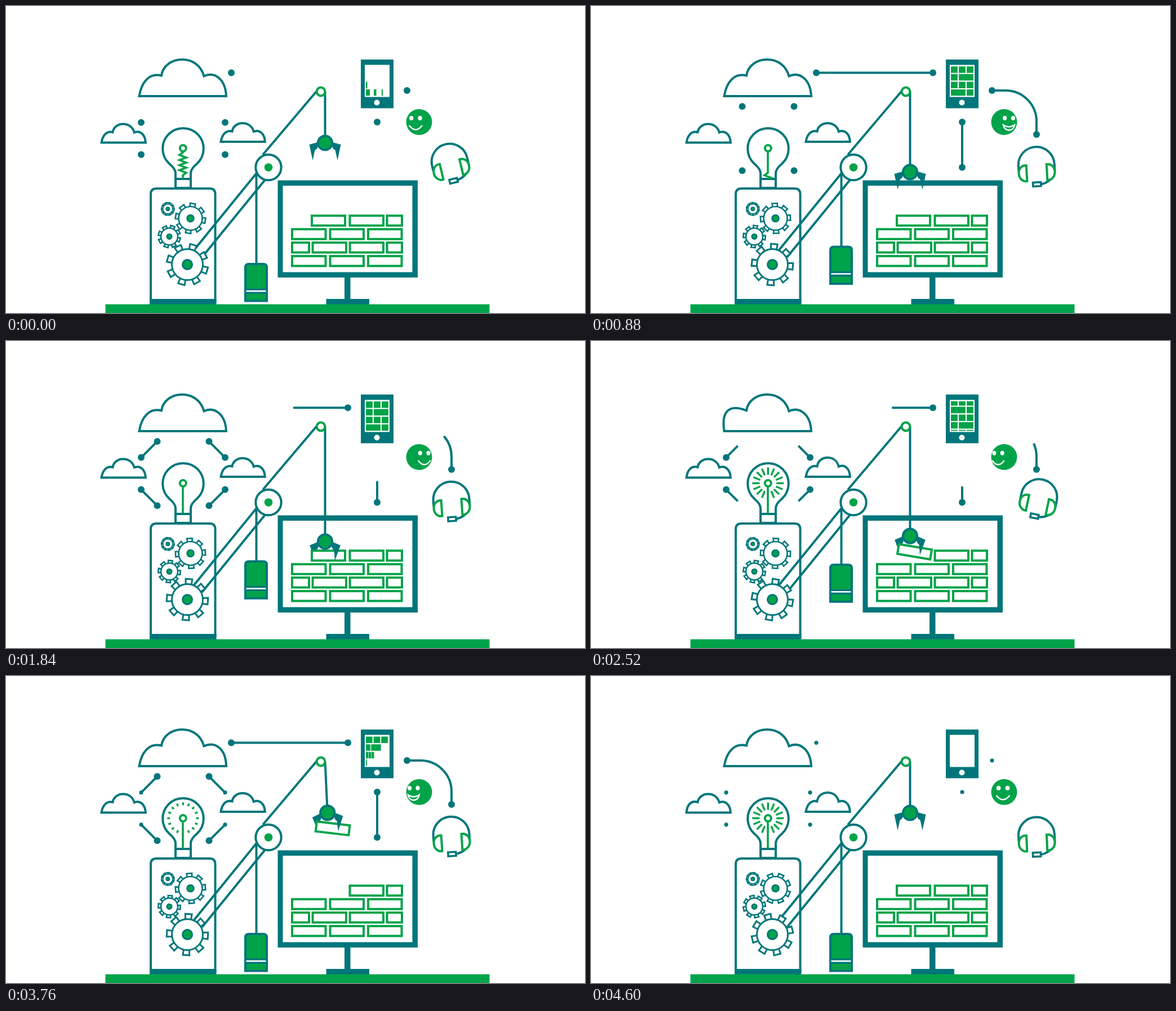
An HTML page with a canvas for the animation above (4.68 s loop, 1028 by 545 pixels).

```html
<!DOCTYPE html>
<html lang="en">
<head>
<meta charset="utf-8">
<title>Idea machine</title>
<style>
html, body { margin: 0; width: 100%; height: 100%; overflow: hidden; background: #fff; }
canvas { display: block; }
</style>
</head>
<body>
<canvas id="stage" width="1028" height="545"></canvas>
<script>
const c = document.getElementById('stage').getContext('2d');
const TEAL = '#00767a', GREEN = '#00a349', WHITE = '#fff';
const LOOP = 4680, STEP = 40, TAU = 2 * Math.PI;
const GRAB = 2360, RELEASE = 4560;

const rad = deg => deg * Math.PI / 180;
const clamp = v => Math.max(0, Math.min(1, v));
const ramp = (t, a, b) => clamp((t - a) / (b - a));
const ease = (t, a, b) => (1 - Math.cos(Math.PI * ramp(t, a, b))) / 2;

function paint(path, fill, stroke, width = 4) {
  if (fill) { c.fillStyle = fill; c.fill(path); }
  if (stroke) { c.strokeStyle = stroke; c.lineWidth = width; c.stroke(path); }
}
const shape = (d, ...style) => paint(new Path2D(d), ...style);

function disc(x, y, r, ...style) {
  if (r <= 0) return;
  const p = new Path2D();
  p.arc(x, y, r, 0, TAU);
  paint(p, ...style);
}

function box(x, y, w, h, ...style) {
  const p = new Path2D();
  p.rect(x, y, w, h);
  paint(p, ...style);
}

function at(x, y, angle, draw, flip = 1) {
  c.save();
  c.translate(x, y);
  c.rotate(rad(angle));
  c.scale(flip, 1);
  draw();
  c.restore();
}

// The lobes of a cloud swell one after another, five times per loop
function cloud(t, x, y, s, shift) {
  const swell = peak => {
    const d = t * 5 / LOOP - .42 - shift - peak;
    const off = Math.abs(d - Math.round(d));
    return off < .15 ? Math.cos(off / .15 * Math.PI / 2) ** 2 : 0;
  };
  const M = swell(-.04), L = swell(.3), R = swell(.72);
  const q = (...v) => v.map(n => n * s).join(' ');
  at(x, y, 0, () => shape(
    `M0 0C${q(4 - 10 * L, -25 - 9 * L, 18 - 12 * L, -42 - 8 * L, 39.5, -36.5)}` +
    `C${q(42, -54 - 12 * M, 58, -65 - 13 * M, 76, -65 - 13 * M)}` +
    `C${q(95, -65 - 13 * M, 110, -54 - 12 * M, 115, -35.5)}` +
    `C${q(134 + 12 * R, -44 - 8 * R, 153 + 10 * R, -30 - 9 * R, 154.5, 0)}Z`, WHITE, TEAL));
}

// Part a..b of a path; each end dot shows while the line reaches it
function link(d, length, x0, y0, x1, y1, a, b, startSize) {
  if (b - a > .002) {
    c.setLineDash([0, a * length, (b - a) * length, 2 * length]);
    shape(d, null, TEAL);
    c.setLineDash([]);
  }
  disc(x0, y0, 6 * startSize * clamp(1 - 8 * a), TEAL);
  disc(x1, y1, 6 * clamp(8 * b - 7), TEAL);
}

function links(t) {
  const leave = ease(t, 4160, 4500);
  const far = [
    ease(t, 1580, 2080) - ease(t, 2330, 2800),
    ease(t, 100, 560) - leave,
    1 - .4 * ramp(t, 4500, 4600)];
  link('M400 118.5H607', 207, 400, 118.5, 607, 118.5, ...far);
  link('M712 150H736A55 55 0 0 1 791 205V228', 133.4, 712, 150, 791, 228, ...far);
  link('M659 206V286.5', 80.5, 659, 206, 659, 286.5, ...far);

  const near = [
    ease(t, 480, 800) - ease(t, 1000, 1400),
    ease(t, 60, 380) - ease(t, 2400, 2740) + ease(t, 2760, 3000) - leave,
    1 - .4 * ease(t, 2740, 2960)];
  for (const sx of [-1, 1])
    for (const sy of [-1, 1]) {
      const x0 = 314.5 + 74.5 * sx, y0 = 235.3 + 28.5 * sy;
      const x1 = x0 - 28.5 * sx, y1 = y0 + 28.5 * sy;
      link(`M${x0} ${y0}L${x1} ${y1}`, 40.3, x0, y0, x1, y1, ...near);
    }
}

function gear(x, y, r, tip, hub, teeth, width, angle) {
  const w = r * .15 + .8, W = r * .17 + 1.2;
  at(x, y, angle, () => {
    for (let i = 0; i < teeth; i++) {
      c.rotate(TAU / teeth);
      shape(`M${-w} ${2 - r}L${-W} ${-tip}H${W}L${w} ${2 - r}Z`, WHITE, TEAL, width);
    }
  });
  disc(x, y, r, WHITE, TEAL, width);
  disc(x, y, hub, GREEN, TEAL, width);
}

function machine(t) {
  shape('M257 524V334Q257 324 267 324H361.5Q371.5 324 371.5 334V524Z', WHITE, TEAL);
  box(255, 520, 118.5, 10, TEAL);
  const spin = .14 * t;
  gear(287.3, 360.3, 8.8, 11.2, 3, 10, 2, spin);
  gear(327.5, 377, 21, 26.5, 6, 8, 2.6, spin + 9);
  gear(290, 409.3, 15, 19.5, 4.3, 8, 2.6, spin + 18);
  shape('M334 433L445 296.5M348 446L460 308.5M456 264L553 149.5', null, TEAL);
  gear(322, 459, 27.5, 36.5, 8.5, 8, 3, spin + 17);
}

function bulb(t) {
  shape('M301 307V297C301 290 296 285 290 280A36.3 36.3 0 1 1 339 280C333 285 328 290 328 297V307Z', WHITE, TEAL);
  box(301, 307, 27, 16, WHITE, TEAL);

  // A coil runs down the stem twice
  const second = t > 2900;
  const tail = 256 + 50 * (second ? ramp(t, 3080, 3500) : ramp(t, -140, 1100));
  const head = 256 + 50 * (second ? ramp(t, 2970, 3230) : ramp(t, -370, 60));
  let d = 'M314 258', side = 1;
  for (let y = 260; y < 306; y += 4.5) {
    d += `L${314 + (y > tail && y < head ? 6 * side : 0)} ${y}`;
    side = -side;
  }
  shape(d + 'L314 306', null, GREEN, 3.6);
  disc(314.3, 252.5, 5.5, WHITE, GREEN);

  // Rays grow from the rim inwards; the first burst dies away
  const late = t > 3300;
  const inner = 28 - 13 * (late ? ramp(t, 3640, 3960) : ramp(t, 2160, 2480));
  const outer = 28 - 13 * (late ? 0 : ramp(t, 2800, 2960));
  if (outer > inner)
    for (let a = -157.5; a < 180; a += 22.5)
      at(314.3, 252.5, a, () => shape(`M0 ${-inner}V${-outer}`, null, GREEN, 3.4));
}

function phone(t) {
  box(630, 95, 58, 86.5, TEAL);
  box(637, 104.5, 44, 57, WHITE);
  disc(658.5, 171.5, 5, WHITE);
  if (t > 4520) return;
  const scroll = 54 * ease(t, 1960, 2980);
  c.save();
  c.beginPath();
  c.rect(638, 107, 42, 52.5);
  c.clip();
  for (let row = -4; row < 4; row++) {
    const k = (row + 4) % 4;
    const left = 1 - ramp(t, 3420 + 110 * k, 3780 + 110 * k);
    for (let col = 0; col < 3; col++) {
      const grown = ramp(t, 90 * k + 50 * col - 140, 90 * k + 50 * col + 100);
      const joined = grown === 1 && k === 2 * col;
      box(639 + 14 * col * left, 148 - 13.6 * row - scroll,
        (12 * grown + (joined ? 2.5 : 0)) * left, 11.5, GREEN);
    }
  }
  c.restore();
}

function features(turn, grin) {
  if (Math.abs(turn) > 86) return;
  c.save();
  c.translate(23 * Math.sin(rad(turn)), 0);
  c.scale(Math.cos(rad(turn)), 1);
  for (const x of [-8, 8]) disc(x, -7, 3.9, WHITE);
  if (grin) shape('M-11 5Q0 12 11 5Q9 14 0 14.5Q-9 14 -11 5Z', null, WHITE, 2.4);
  else shape('M-12 6Q0 21 12 6', null, WHITE, 2.5);
  c.restore();
}

function face(t) {
  const turn = 27 * Math.sin(4 * TAU * t / LOOP + rad(215));
  const half = t % (LOOP / 2), grin = half > 400 && half < 1630;
  at(733.5, 206, 0, () => {
    disc(0, 0, 23, GREEN);
    c.beginPath();
    c.arc(0, 0, 23, 0, TAU);
    c.clip();
    features(turn, grin);
    features(turn - 110, grin);
  });
}

// Rests at a slight tilt and shakes twice per loop
function headset(t) {
  const s = (t + 200) % (LOOP / 2);
  const shake = s < 1100 ? Math.sin(Math.PI * s / 1100) : 0;
  const tilt = 18 * shake * Math.cos(TAU * (s - 380) / 330) - 4;
  at(791.8, 302 - .6 * Math.abs(tilt), tilt, () => {
    c.translate(0, -16);
    shape('M-32 8V-2A32 32 0 0 1 32 -2V10Q28 29 6 33', null, TEAL);
    for (const flip of [1, -1])
      at(0, 0, 0, () => shape('M-18 -2V26C-26 27 -32 20 -32 12C-32 4 -27 -3 -18 -2Z', WHITE, GREEN), flip);
    box(-8, 29, 14, 7, WHITE, TEAL, 3.6);
  });
}

const brick = (x, y, w) => box(x + 2, y + 2, w - 4, 17.5, WHITE, GREEN);

function monitor() {
  box(482.5, 309.5, 248.5, 172.5, TEAL);
  box(491.5, 319, 230, 153.5, WHITE);
  box(601, 481, 10.5, 40, TEAL);
  box(568.5, 520, 76.5, 10, TEAL);
  // Running bond; the first brick of the top row is the loose one
  for (let row = 0; row < 4; row++)
    for (let i = row ? 0 : 2; i < 4; i++) {
      const x = row % 2 ? 506 + 67.5 * i : 476.5 + 66 * i;
      const from = Math.max(506, x), to = Math.min(705, x + 63.5);
      if (to > from) brick(from, 370.3 + 23.9 * row, to - from);
    }
}

function crane(t) {
  const lower = 113 * (ease(t, 195, 1640) - ease(t, 2350, 3240))
    - 10 * Math.sin(Math.PI * ramp(t, 3150, 3360));
  const held = t < RELEASE;
  const grip = held ? 8 * ease(t, 1640, 1800) : 0;
  const sag = held ? ease(t, GRAB, 2500) : 0;
  const s = t - 3220;
  const sway = 4.5 * Math.sin(TAU * s / 720) * (s > 0 ? clamp(1 - s / 1340) : 0);

  const rise = -.59 * lower;
  shape(`M444.5 296V${458 + rise}`, null, TEAL);
  at(0, rise, 0, () => {
    shape('M425 523.5V464Q425 458 431 458H457Q463 458 463 464V523.5Z', GREEN, TEAL);
    box(425, 501.3, 38, 9.7, TEAL);
    box(426.5, 504.8, 35, 2.6, WHITE);
  });
  disc(466, 286.5, 22.7, WHITE, TEAL);
  disc(466, 286.5, 7.3, GREEN);

  const claw = () => shape('M-28 3L-10 -2L-14 10L-18 13L-22 31Z', TEAL);
  at(566.5, 152, sway, () => {
    const y = 91 + lower;
    shape(`M0 0V${y}`, null, TEAL);
    at(0, y, -grip, claw);
    const brickY = held && t >= GRAB ? y + 25 : 229;
    at(6 + 2 * sag, brickY + 3 * sag, 9.5 * sag, () => brick(-31.5, -10.8, 63));
    at(0, y, grip, claw, -1);
    disc(0, y, 12.6, GREEN, TEAL);
  });
  disc(559, 152, 7.4, WHITE, GREEN);
}

function frame(now) {
  const t = Math.min(LOOP - 2 * STEP, Math.floor(now % LOOP / STEP) * STEP);
  c.fillStyle = WHITE;
  c.fillRect(0, 0, 1028, 545);
  cloud(t, 236.5, 160, 1, 0);
  cloud(t, 169.5, 242.5, .507, .09);
  cloud(t, 381.5, 241, .507, .425);
  links(t);
  bulb(t);
  machine(t);
  phone(t);
  face(t);
  headset(t);
  monitor();
  crane(t);
  box(176.5, 529.5, 682, 15.5, GREEN);
}

const start = performance.now();
function tick() {
  frame(performance.now() - start);
  requestAnimationFrame(tick);
}
tick();
</script>
</body>
</html>
```
